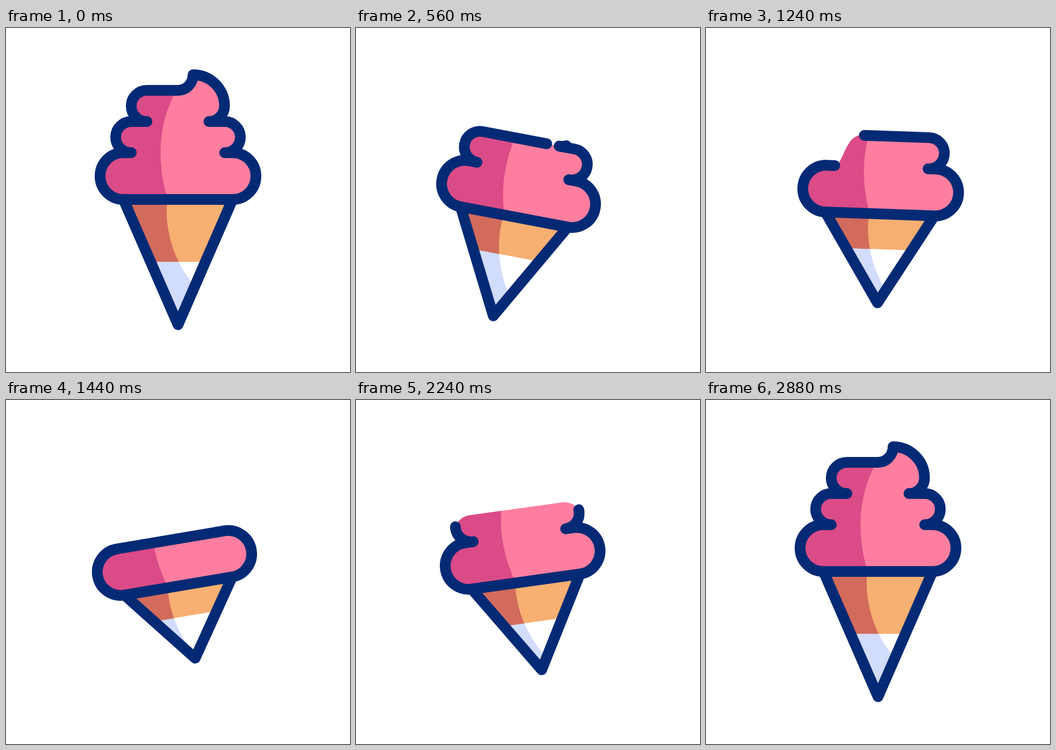
An HTML page with a canvas that plays this animation: 640 by 640 pixels, repeating every 3000 ms.

```html
<!DOCTYPE html>
<html lang="en">
<head>
<meta charset="utf-8">
<title>Ice cream</title>
<style>
html, body { margin: 0; width: 100%; height: 100%; overflow: hidden; background: #fff; }
canvas { display: block; width: 640px; height: 640px; }
</style>
</head>
<body>
<canvas id="stage"></canvas>
<script>
const NAVY = '#042a75', PINK = '#ff7e9f', ROSE = '#db4b87', ORANGE = '#f7af72',
  BROWN = '#d36b5c', LILAC = '#d2dcfc', YELLOW = '#ffcc50';
const LOOP = 3000, STEP = 40, LAST = 2880;

const canvas = document.getElementById('stage');
const ctx = canvas.getContext('2d');
const dpr = window.devicePixelRatio || 1;
canvas.width = canvas.height = 640 * dpr;

const part = (t, a, b) => Math.min(1, Math.max(0, (t - a) / (b - a)));
const ease = (t, a, b) => 0.5 - 0.5 * Math.cos(Math.PI * part(t, a, b));
const mix = (a, b, p) => a + (b - a) * p;

// x, y, tilt, tip x, tip y, wafer edge
const UPRIGHT = [320, 275.5, 0, 0, 233, 116];
const RIGHT = [302, 309.5, 11, -4, 187, 72];
const LEFT = [304.8, 304.8, -12.1, 10, 131.6, 56];

function poseAt(t) {
  const [from, to, p] = t < 1000 ? [UPRIGHT, RIGHT, ease(t, 0, 620)]
    : t < 2000 ? [RIGHT, LEFT, ease(t, 1000, 1560)]
    : [LEFT, UPRIGHT, ease(t, 2000, 2600)];
  const pose = from.map((v, i) => mix(v, to[i], p));
  if (from === RIGHT) {
    const arc = 4 * p * (1 - p);
    pose[0] += 23 * arc;
    pose[1] -= 5.5 * arc;
  }
  return pose;
}

const base = new Path2D('M233 232H218.5A43.5 43.5 0 0 0 218.5 319H421.5A43.5 43.5 0 0 0 421.5 232H407');
const baseFill = new Path2D('M218.5 232A43.5 43.5 0 0 0 218.5 319H421.5A43.5 43.5 0 0 0 421.5 232Z');
const shade = new Path2D('M100 60H340L316 118C290 165 275 235 301 319V330H100Z');
const coneShade = new Path2D('M-150 -5H-20V0C-26 55 -8 115 30 160L60 190V260H-150Z');

function layer(d, foot, left, right, y, length, erase, rise) {
  return {
    line: new Path2D(d),
    fill: new Path2D(`${d}V${y + 8}H${foot}Z`),
    left, y, length, erase, rise
  };
}
const middle = layer('M233 232A29 29 0 0 1 233 174H407A29 29 0 0 1 407 232',
  233, 204, 436, 232, 356.2, [1115, 1400], [2060, 2300]);
const crown = layer('M262 174A29 29 0 0 1 262 116H320A28 29 0 0 0 348 87' +
  'A58.5 58 0 0 1 406.5 145A29 29 0 0 1 377.5 174',
  262, 233, 407, 174, 331, [300, 600], [2500, 2740]);

function strokePart(path, from, to) {
  if (to - from < 0.1) return;
  ctx.setLineDash([to - from, 2000]);
  ctx.lineDashOffset = -from;
  ctx.stroke(path);
  ctx.setLineDash([]);
}

function line(x1, y1, x2, y2) {
  ctx.beginPath();
  ctx.moveTo(x1, y1);
  ctx.lineTo(x2, y2);
  ctx.stroke();
}

function twoTone() {
  ctx.fillStyle = PINK;
  ctx.fillRect(100, 50, 440, 290);
  ctx.fillStyle = ROSE;
  ctx.fill(shade);
}

function drawCone(tipX, tipY, edge) {
  const sides = new Path2D(`M-101.5 0L${tipX} ${tipY}L101.5 0`);
  ctx.save();
  ctx.translate(320, 319);
  ctx.save();
  ctx.clip(sides);
  ctx.fillStyle = LILAC;
  ctx.fill(coneShade);
  ctx.beginPath();
  ctx.rect(-150, -10, 300, edge + 10);
  ctx.clip();
  ctx.fillStyle = ORANGE;
  ctx.fillRect(-150, -10, 300, edge + 10);
  ctx.fillStyle = BROWN;
  ctx.fill(coneShade);
  ctx.restore();
  ctx.stroke(sides);
  ctx.restore();
}

function fillLayer(l, t) {
  const gone = ease(t, ...l.erase), grown = ease(t, ...l.rise);
  if (gone === 1 && grown === 0) return;
  ctx.save();
  if (gone < 1 && gone > 0) {
    const x = l.left + 290 * gone ** 1.8, y = l.y;
    ctx.clip(new Path2D(`M900 0H${x + 20}V${y - 58}C${x - 10} ${y - 58} ${x - 12} ${y} ${x - 28} ${y}V${y + 20}H900Z`));
  }
  const still = ctx.getTransform();
  if (gone === 1) {
    ctx.translate(0, l.y);
    ctx.scale(1, grown);
    ctx.translate(0, -l.y);
  }
  ctx.clip(l.fill);
  ctx.setTransform(still);
  twoTone();
  ctx.restore();
}

function strokeMiddle(t) {
  const { line: path, length } = middle, half = length / 2;
  if (t < 1115) {
    strokePart(path, 0, mix(120.1, 236, ease(t, 420, 620)));
    strokePart(path, 236.1, length);
  } else if (t < 2060) {
    strokePart(path, length * ease(t, ...middle.erase), length);
  } else {
    const reach = half * ease(t, 2100, 2500) - (half - 120.1) * ease(t, 2500, 2600);
    strokePart(path, 0, reach);
    strokePart(path, length - reach, length);
  }
}

function strokeCrown(t) {
  const { line: path, length } = crown;
  if (t < 2000) {
    strokePart(path, length * ease(t, ...crown.erase), length);
  } else {
    strokePart(path, 0, 194 * part(t, 2520, 2860));
    strokePart(path, length - 137 * part(t, 2640, 2880), length);
  }
}

function strokeLid(t) {
  if (t < 2020) {
    const p = ease(t, 1260, 1440);
    if (p > 0) line(233, 232, mix(233, 407, p), 232);
  } else {
    const p = ease(t, 2020, 2140);
    if (p === 1) return;
    line(233, 232, mix(320, 233, p), 232);
    line(mix(320, 407, p), 232, 407, 232);
  }
}

const RAYS = [[-86, 17, -47, 40], [0, 0, 1, 37.5], [87.5, 14, 44, 40]];

function drawBurst(t, start, x, y, turn) {
  const age = t - start;
  if (age <= 0 || age >= 540) return;
  const out = ease(age, 0, 120) + 0.07 * part(age, 300, 480);
  const back = ease(age, 400, 540);
  ctx.save();
  ctx.strokeStyle = YELLOW;
  ctx.translate(x, y);
  ctx.rotate(turn * Math.PI / 180);
  for (const [rx, ry, angle, size] of RAYS) {
    ctx.save();
    ctx.translate(rx, ry);
    ctx.rotate(angle * Math.PI / 180);
    line(0, -size * out * back, 0, -size * out);
    ctx.restore();
  }
  ctx.restore();
}

function draw(t) {
  const [x, y, tilt, tipX, tipY, edge] = poseAt(t);
  ctx.setTransform(dpr, 0, 0, dpr, 0, 0);
  ctx.fillStyle = '#fff';
  ctx.fillRect(0, 0, 640, 640);
  ctx.lineWidth = 20;
  ctx.lineCap = ctx.lineJoin = 'round';
  ctx.strokeStyle = NAVY;
  ctx.translate(x, y);
  ctx.rotate(tilt * Math.PI / 180);
  ctx.translate(-320, -275.5);

  drawCone(tipX, tipY, edge);
  ctx.save();
  ctx.clip(baseFill);
  twoTone();
  ctx.restore();
  fillLayer(middle, t);
  fillLayer(crown, t);
  strokeCrown(t);
  strokeMiddle(t);
  ctx.stroke(base);
  strokeLid(t);
  drawBurst(t, 640, 319.4, 96, -2.5);
  drawBurst(t, 1580, 312.5, 153, 2);
}

const begin = performance.now();
function tick() {
  const t = (performance.now() - begin) % LOOP;
  draw(Math.min(LAST, Math.floor(t / STEP) * STEP));
  requestAnimationFrame(tick);
}
tick();
</script>
</body>
</html>
```
